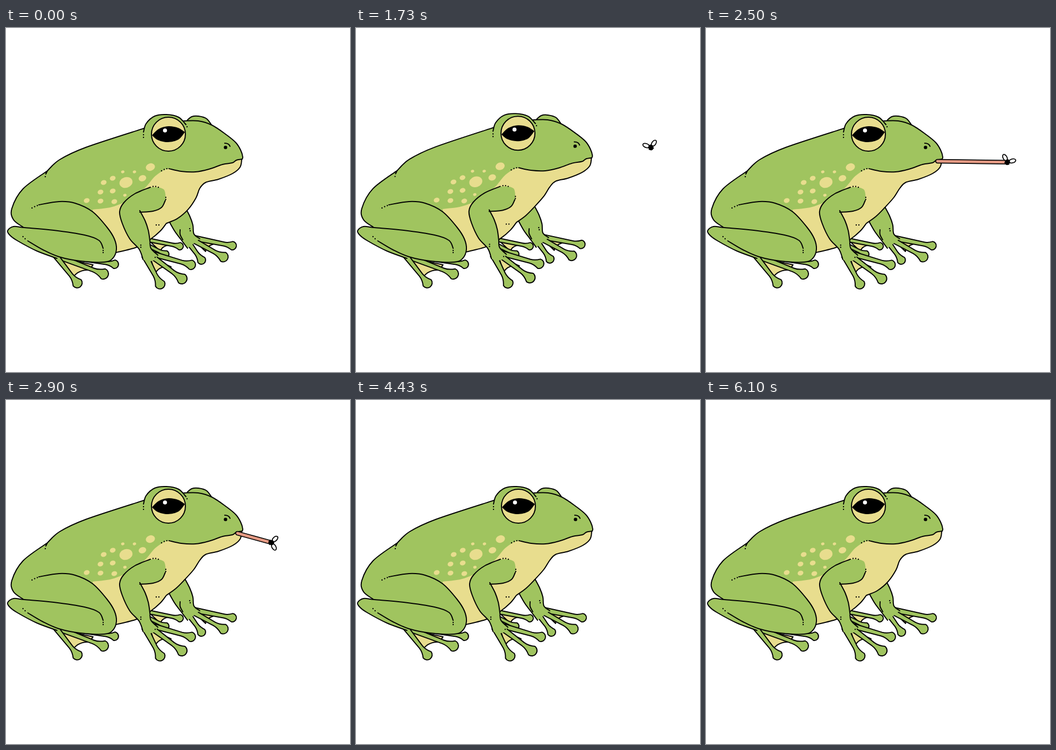
These frames come from a looping animation (648x648 px, 6.13 s). An HTML page:

```html
<!DOCTYPE html>
<html lang="en">
<head>
<meta charset="utf-8">
<title>Frog and fly</title>
<style>
  html, body { margin: 0; width: 100%; height: 100%; overflow: hidden; background: #fff; }
  svg { display: block; width: 100vw; height: 100vh; }
  .green { fill: #a0c45f; }
  .cream { fill: #e8dd8e; }
  .line { fill: none; stroke: #000; stroke-width: 2; stroke-linecap: round; stroke-linejoin: round; }
  .edge { stroke: #000; stroke-width: 2; stroke-linejoin: round; }
  .tongue { fill: none; stroke-linecap: round; }
</style>
</head>
<body>
<svg viewBox="0 0 648 648">
  <g id="farFoot"></g>
  <g id="farArm"></g>
  <g id="body"></g>
  <g id="hindLeg"></g>
  <g id="arm"></g>
  <g id="tongue">
    <path class="tongue" stroke="#000" stroke-width="8.5"/>
    <path class="tongue" stroke="#e59a84" stroke-width="5"/>
  </g>
  <g id="fly"></g>
</svg>
<script>
const LOOP = 6130;
const $ = id => document.getElementById(id);
const parse = text => text.split(' ').map(pair => pair.split(',').map(Number));
const path = (cls, d) => `<path class="${cls}" d="${d}"/>`;
const dots = text => parse(text).map(([x, y]) => `<circle cx="${x}" cy="${y}" r="1.2"/>`).join('');

// Smooth curve through a few key points.
function curve(text) {
  const p = parse(text);
  const at = i => p[Math.max(0, Math.min(p.length - 1, i))];
  const handle = (i, side) => [0, 1].map(k => at(i)[k] + side * (at(i + 1)[k] - at(i - 1)[k]) / 6);
  return 'M' + p[0] + p.slice(1).map((end, i) => `C${handle(i, 1)} ${handle(i + 1, -1)} ${end}`).join('');
}
const join = (first, ...rest) => first + rest.map(d => d.replace('M', 'L')).join('');

// A tapering toe that ends in a round pad of radius r.
function toe(from, to, r, base = 5, neck = 3.6) {
  const [[x0, y0], [x1, y1]] = parse(from + ' ' + to);
  const length = Math.hypot(x1 - x0, y1 - y0);
  const ux = (x1 - x0) / length, uy = (y1 - y0) / length;
  const at = (along, side) => `${x0 + ux * along - uy * side},${y0 + uy * along + ux * side} `;
  const n = length - 2 * r, q = length - r;
  return path('green edge',
    `M${at(0, base)}L${at(n, neck)}Q${at(q, neck)}${at(length, r)}` +
    `A${r},${r} 0 0 0 ${at(length, -r)}Q${at(q, -neck)}${at(n, -neck)}L${at(0, -base)}`);
}

const back = curve('32,375 14,361 11,340 32,303 78,269');
const spine = curve('78,269 101,248 150,225 260,189');
const head = curve('336,175 362,175 388,183 415,201 433,216 442,230 446,243 444,248');
const mouth = curve('307,265 330,270 357,271 382,266 408,257 426,254 434,249 445,247');
const underside = curve('302,368 291,382 272,398 246,413 207,423');
const bellyEdge = curve('163,342 200,337 235,322 262,301 280,280 298,267');
const eyelid = curve('259,196 264,180 280,166 302,163 325,168 339,182');
const throat = puff => curve('444,248 441,262 427,274 400,285 376,291 365,302 ' +
  `${354 + 4 * puff},${319 + puff} ${337 + 6 * puff},${338 + 4 * puff} ${320 + 3 * puff},${355 + 4 * puff} 302,368`);

// Spots crowding the big one stay small; those nearer the head grow.
const BIG = { x: 226, y: 291 };
const spot = (x, y, r) =>
  `<ellipse class="cream" cx="${x}" cy="${y}" rx="${r}" ry="${r * .8}" transform="rotate(-18 ${x} ${y})"/>`;
const spots = spot(BIG.x, BIG.y, 12.5) +
  parse('184,291 201,283 220,271 242,271 272,262 178,309 201,307 257,283 152,325 178,326 204,327 224,315')
    .map(([x, y]) => spot(x, y, Math.hypot(x - BIG.x, y - BIG.y) < 25.8 ? 3.2 : 5.5 + Math.max(0, x - 240) * .1))
    .join('');

$('farFoot').innerHTML =
  path('cream edge', 'M268,399L312,408Q293,410 291,421Z') +
  toe('262,398', '327,411', 7, 3.5, 3) + toe('260,406', '300,426', 7, 3.5, 3);

const farLeft = curve('306,362 318,383 330,399 342,415');
const farRight = curve('365,397 354,388 352,371 346,354 336,335');
$('farArm').innerHTML =
  path('cream edge', 'M350,396L391,407Q377,411 376,421Z') +
  toe('346,394', '426,410', 8) + toe('346,396', '409,431', 9.5) + toe('341,400', '368,437', 8) +
  path('green', join(farLeft, farRight)) + path('line', farLeft + farRight) +
  path('line', curve('328,380 328,389 333,399')) + dots('346,378 347,382');

$('body').innerHTML =
  path('green edge', curve('341,174 350,167 362,166 378,171 390,187')) +
  '<path id="skin" class="green"/><path id="belly" class="cream"/>' + spots +
  path('line', 'M75,275L78,269' + back + join(spine, head) + mouth) +
  '<path id="jaw" class="line"/>' +
  path('green', eyelid + 'L339,200L290,232L258,200Z') + path('line', eyelid) +
  '<circle class="cream edge" cx="306" cy="200" r="32"/>' +
  path('', join(curve('275,202 288,190 306,185 324,188 337,196'), curve('337,196 325,210 305,215 286,211 275,202'))) +
  '<circle cx="299.5" cy="193" r="3.8" fill="#fff"/>' +
  '<circle cx="413.5" cy="225" r="3.2"/>' + path('line', 'M412,217Q420,217 422,223') +
  dots('74,280 259,201 259,206 341,186 303,265 298,266.5 293,269 283,371 288,371');

const thigh = curve('62,333 100,327 130,330 163,346 190,375 204,397 208,417 201,434 185,441 140,439 100,431 70,418 41,401');
const shank = curve('96,434 58,420 22,401 8,391 3,382 14,374 35,376 90,381 148,390 175,400 183,415');
$('hindLeg').innerHTML =
  path('cream edge', 'M98,432L164,446Q160,450 162,456Q137,454 127,469Z') +
  toe('108,430', '204,445', 8, 4, 3) + toe('100,431', '183,463', 10) + toe('92,427', '134,480', 9.5) +
  path('green', thigh + shank) + path('line', thigh + shank) +
  dots('49,339 54,336.5 59,334.5 32,393 36,397 183,419 183,423');

const armOuter = curve('272,300 243,312 222,329 214,346 219,368 233,397 251,417 258,436');
const forearm = curve('286,428 273,415 271,400 268,381 262,363 252,344');
const elbow = curve('252,347 277,345 293,338 300,325');
$('arm').innerHTML =
  path('cream edge', 'M272,432L281,463Q288,447 311,450Z') +
  toe('274,425', '348,446', 9) + toe('272,428', '331,472', 10) + toe('261,428', '290,482', 9.5, 6, 4) +
  path('green', join(armOuter, 'M268,441L280,437', forearm, elbow, curve('301,320 298,305 287,300'))) +
  path('line', armOuter + forearm + elbow) +
  dots('277,298.5 282,298.5 287,300 301,319 301,323 254,409 254,413 281,432');

const wing = side =>
  `<ellipse rx="6.5" ry="3.7" fill="#fff" stroke="#000" stroke-width="1.8"
    transform="translate(${7.6 * side} -6) rotate(${-38 * side})"/>`;
$('fly').innerHTML = wing(-1) + wing(1) +
  '<ellipse rx="4.8" ry="5.6"/><path d="M-5,-2L5,3M5,-2L-5,3" stroke="#000" stroke-width="1.5"/>';

// Eased 0 to 1 between two times.
function ramp(t, from, to) {
  const u = Math.min(1, Math.max(0, (t - from) / (to - from)));
  return u * u * (3 - 2 * u);
}

const MOUTH = { x: 436, y: 251 };
const STRIKE = 2000, CATCH = 2400, PULL = 2650, SWALLOW = 3120;

// The throat swells steadily whenever the frog is not hunting.
function breath(t) {
  const s = t < 310 ? t + LOOP : t;
  return s < SWALLOW ? 0 : .5 - .5 * Math.cos(2 * Math.PI * (s - 4430) / 668);
}

function tongueTip(t) {
  const reach = ramp(t, STRIKE, STRIKE + 140) - ramp(t, PULL, SWALLOW);
  const lift = ramp(t, 2150, CATCH) - ramp(t, CATCH, PULL);
  return { x: MOUTH.x + 142 * reach - 16 * lift, y: MOUTH.y + 39 * reach - 58 * lift };
}

function drawFrog(t) {
  const jaw = join(throat(breath(t)), underside);
  $('skin').setAttribute('d', join(back, spine, head, jaw) + 'Z');
  $('belly').setAttribute('d', join(mouth, jaw, 'M180,400', bellyEdge) + 'Z');
  $('jaw').setAttribute('d', jaw);

  const tilt = -.34 * ramp(t, 1400, 1700) + .66 * ramp(t, 1930, 2060) - .32 * ramp(t, 2100, 2400);
  const lean = .025 * (ramp(t, 1330, 1700) - ramp(t, 2130, 2600));
  const turn = `rotate(${tilt} 10 350)`;
  $('body').setAttribute('transform', turn);
  for (const id of ['arm', 'farArm'])
    $(id).setAttribute('transform', `${turn} matrix(1 0 ${-lean} 1 ${300 * lean} 0)`);
}

function drawTongue(t, tip) {
  $('tongue').style.display = t > STRIKE && t < SWALLOW ? '' : 'none';
  const dx = tip.x - MOUTH.x, dy = tip.y - MOUTH.y;
  const bend = 15 * (1 - ramp(t, 2130, CATCH));
  const d = `M${MOUTH.x},${MOUTH.y}C${MOUTH.x + dx * .33},${MOUTH.y + dy * .33 - bend} ` +
    `${MOUTH.x + dx * .6},${MOUTH.y + dy * .6 + bend * 1.1} ${tip.x},${tip.y}`;
  for (const stroke of $('tongue').children) stroke.setAttribute('d', d);
}

function drawFly(t, tip) {
  $('fly').style.display = t >= 30 && t < SWALLOW ? '' : 'none';
  const hover = {
    x: 551 + 11 * ramp(t, 1200, CATCH),
    y: 228.5 - 3.5 * Math.sin(2 * Math.PI * (t - 1400) / 1300)
  };
  const { x, y } = t < CATCH ? hover : tip;
  const spin = -17 * ramp(t, 1000, 1700) + 115 * ramp(t, CATCH, PULL);
  $('fly').setAttribute('transform', `translate(${x} ${y}) rotate(${spin}) scale(${ramp(t, 0, 180)})`);
}

function draw(t) {
  const tip = tongueTip(t);
  drawFrog(t);
  drawTongue(t, tip);
  drawFly(t, tip);
}

const start = performance.now();
function tick() {
  draw((performance.now() - start) % LOOP);
  requestAnimationFrame(tick);
}
tick();
</script>
</body>
</html>
```
